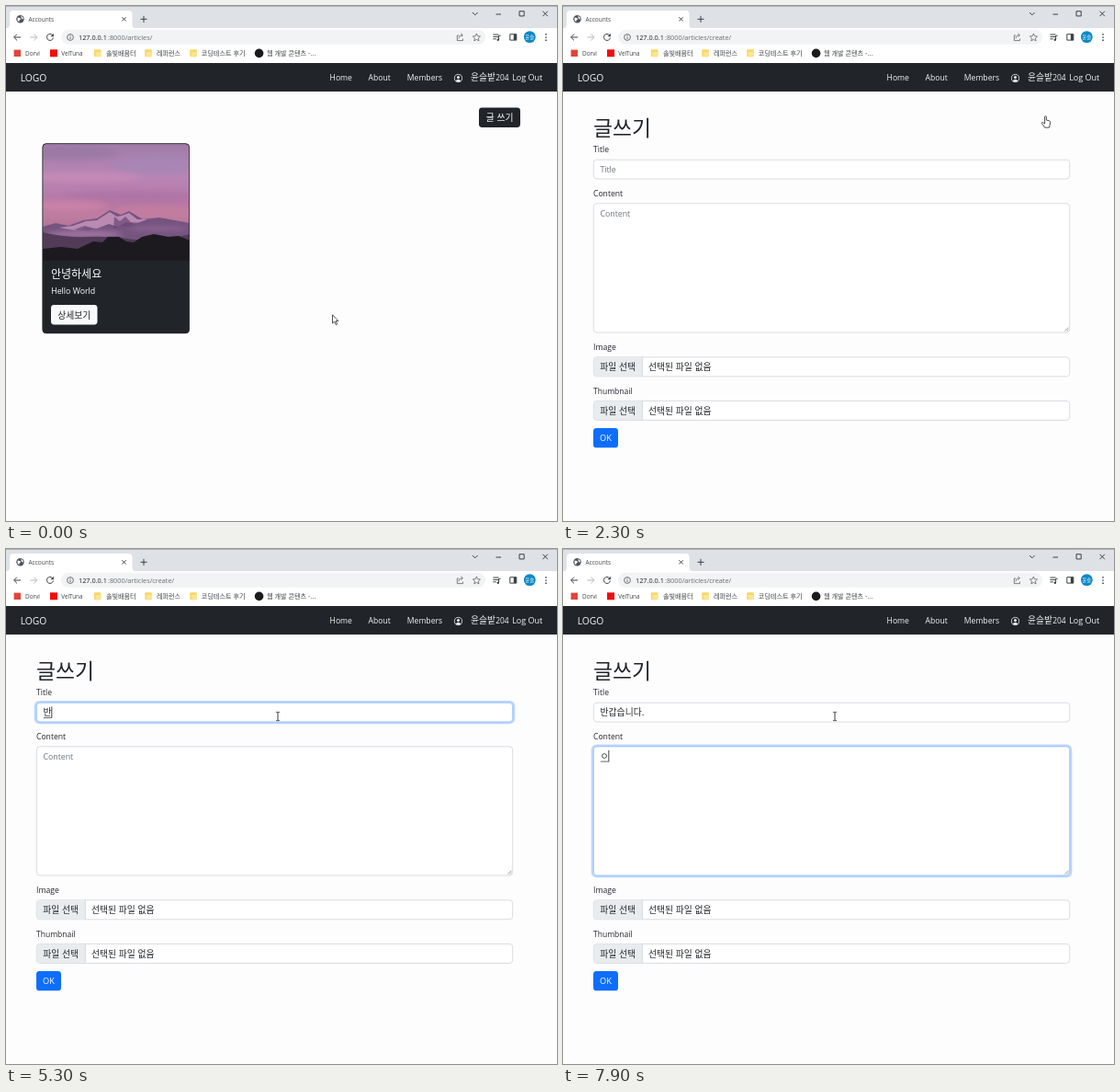
Recreate the animation shown at these times as an HTML page. Size 600 by 560 pixels, loop 8000 ms.

```html
<!DOCTYPE html>
<html lang="ko">
<head>
<meta charset="utf-8">
<title>Accounts</title>
<style>
  html, body { margin: 0; width: 100%; height: 100%; overflow: hidden; background: #fefdfe; }
  svg { display: block; width: 100%; height: 100%; }
  text { font-family: "Open Sans", "Noto Sans", sans-serif; font-size: 8.6px; fill: #212529; white-space: pre; }
  text.ko { font-family: "Noto Sans CJK KR", "Noto Sans CJK", "Noto Sans CJK JP", sans-serif; font-size: 9.8px; }
  .line { fill: none; stroke: #3c4043; stroke-width: 1; }
</style>
</head>
<body>
<svg id="stage" viewBox="0 0 600 560" xmlns="http://www.w3.org/2000/svg"></svg>
<script>
const LOOP = 8000, STEP = 100;
const HANGUL = /[\u3131-\u318e\uac00-\ud7a3]/;
const stage = document.getElementById('stage');

// Markup helpers
const text = (x, y, s, size, fill, extra = '') =>
  `<text class="${HANGUL.test(s) ? 'ko' : ''}" x="${x}" y="${y}" style="` +
  `${size ? `font-size:${size}px;` : ''}${fill ? `fill:${fill}` : ''}" ${extra}>${s}</text>`;
const rect = (x, y, w, h, r, fill, extra = '') =>
  `<rect x="${x}" y="${y}" width="${w}" height="${h}" rx="${r}" fill="${fill}" ${extra}/>`;
const circle = (x, y, r, fill, extra = '') =>
  `<circle cx="${x}" cy="${y}" r="${r}" fill="${fill}" ${extra}/>`;
const line = (d, extra = '') => `<path class="line" d="${d}" ${extra}/>`;
const shape = (d, fill, extra = '') => `<path d="${d}" fill="${fill}" ${extra}/>`;
const blob = (x, y, rx, ry, fill, o) =>
  `<ellipse cx="${x}" cy="${y}" rx="${rx}" ry="${ry}" fill="${fill}" opacity="${o}" filter="url(#soft)"/>`;
const folder = x =>
  rect(x - 3.8, 47.2, 7.6, 8, 1, '#f8d767') + rect(x - 2.2, 50, 6, 5.2, .8, '#fbe493');

function browser() {
  const tabStrip =
    rect(0, 0, 600, 24, 0, '#dee1e6') + rect(0, 0, 600, .7, 0, '#a4a6aa') +
    shape('M1 24Q4 24 4 20V9Q4 5 8 5H133.5Q137.5 5 137.5 9V20Q137.5 24 140.5 24Z', '#fff') +
    circle(15.5, 14.2, 4.2, '#50545a') +
    shape('M12.6 12.4l2.6 .5 1 1.4 -1.6 1 -.4 2 -1.6-1.6zM16 11l2.2 1 .6 2.4 -1.6-.4z', '#fff') +
    text(24.5, 16.7, 'Accounts', 6.5, '#45484c') +
    line('M126.4 12.2l4.2 4.2m0-4.2l-4.2 4.2') +
    line('M146.5 14.3h7m-3.5-3.5v7') +
    line('M508 7l2.8 2.8 2.8-2.8', 'stroke-width=".9"') +
    line('M533.5 9h5.5') +
    line('M559 5.7h5.2v5.2h-5.2z') +
    line('M584.5 5.7l5.4 5.4m0-5.4l-5.4 5.4');
  const tools =
    rect(0, 24, 600, 38, 0, '#fff') + rect(60, 25.8, 462, 16, 8, '#f1f3f4') +
    line('M16 34H8.7m3.3-3.4L8.6 34l3.4 3.4') +
    line('M26.4 34h7.3m-3.3-3.4l3.4 3.4-3.4 3.4', 'style="stroke:#b5b8bc"') +
    line('M50.6 31.6a3.5 3.5 0 1 0 .8 3') + shape('M51.9 29.8v3.4h-3.4z', '#3c4043') +
    circle(70, 34, 3.4, 'none', 'stroke="#5f6368" stroke-width=".9"') +
    line('M70 33.5v2.4M70 31.7v.9', 'style="stroke:#5f6368"') +
    text(79, 36.6, '127.0.0.1', 7.3, '#202124') +
    text(111, 36.6, '', 7.3, '#686c70', 'id="path"') +
    line('M493.3 32h-2v5.6h6.2v-2M493 35.4c.2-2.6 1.6-3.6 4-3.7m-1.6-1.8l2 1.8-2 1.9', 'style="stroke:#5f6368;stroke-width:.8"') +
    line('M512.4 30l1.2 2.7 2.9.3-2.2 2 .7 2.9-2.6-1.5-2.6 1.5.7-2.9-2.2-2 2.9-.3z', 'style="stroke:#5f6368;stroke-width:.8"') +
    line('M530.4 31h6m-6 2.4h6m-6 2.4h3.4m2.8 1v-4.6h2') + circle(535.8, 36.8, 1.2, '#3c4043') +
    line('M548.8 30.7h7v6.4h-7z') + rect(552.8, 30.7, 3, 6.4, 0, '#3c4043') +
    circle(570.3, 33.6, 6.4, '#0b88c6') +
    text(570.3, 35.7, '윤슬', 5.4, '#fff', 'text-anchor="middle"') +
    [30.8, 34, 37.2].map(y => circle(588, y, .85, '#3c4043')).join('');
  const marks =
    rect(8.6, 47.6, 7.4, 7.4, 0, '#e0453a') + text(21, 53.6, 'Dorvi', 6.4, '#3c4043') +
    rect(48, 47.3, 8, 8, 0, '#f00d0d') + text(60.3, 53.6, 'VelTuna', 6.3, '#3c4043') +
    folder(99.6) + text(109, 53.8, '솔빛배움터', 7.1, '#3c4043') +
    folder(155) + text(164, 53.8, '레퍼런스', 7.1, '#3c4043') +
    folder(204) + text(212.8, 53.8, '코딩테스트 후기', 7.1, '#3c4043') +
    circle(275.6, 51.4, 4.8, '#1b1b1d') + text(284, 53.8, '웹 개발 콘텐츠 -...', 7.1, '#3c4043');
  return tabStrip + tools + marks;
}

function navbar() {
  const white = '#f4f4f5';
  return rect(0, 62, 600, 31, 0, '#212529') +
    text(15.7, 81.8, 'LOGO', 10.3, white) +
    text(352.6, 80.9, 'Home', 8.6, white) +
    text(394.6, 80.9, 'About', 8.6, white) +
    text(436.8, 80.9, 'Members', 8.6, white) +
    circle(492.5, 78.5, 4.1, 'none', `stroke="${white}" stroke-width=".8"`) +
    circle(492.5, 77.4, 1.5, white) + shape('M489.6 81.2q2.9-3 5.8 0q-2.9 2.4-5.8 0z', white) +
    text(506, 81.4, '윤슬밭', 9.8, white) + text(533.2, 80.9, '204', 8.4, white) +
    text(551.2, 80.9, 'Log Out', 9, white);
}

function photo() {
  return `<g clip-path="url(#frame)">` + rect(40, 150, 160, 127, 0, 'url(#sky)') +
    blob(70, 160, 50, 7, '#9077a0', .55) + blob(165, 172, 48, 11, '#a387b6', .6) +
    blob(85, 186, 60, 6, '#cd8db8', .55) + blob(135, 206, 70, 5, '#a56fa3', .5) +
    blob(65, 217, 45, 6, '#d488a9', .6) + blob(160, 222, 45, 6, '#c87fa0', .55) +
    shape('M40 240l14-4 14 3 16-6 15-2 14-9 12 5 9-4 15 9 18-2 33 6v45H40z', '#75547f') +
    shape('M58 241l15-2 14-5 12-1 14-9 8 5 5-1 8-3 9 7 11 0-14 5-9-2-9 5-10-3-13 5-12-1-12 3z', '#c794bd', 'opacity=".85"') +
    shape('M118 229l6 5 6-5 6 6 8 1-8 5-10-2-9 3zM74 243l12-4 10 3-8 3z', '#694873', 'opacity=".7"') +
    blob(85, 248, 42, 4, '#a77aa5', .8) + blob(165, 242, 34, 3.5, '#8d6593', .75) +
    shape('M40 246q22 6 48 5t52 3 60-6v30H40z', '#513b57') +
    shape('M40 264l20-2 18 2 17-8 10 1 6-6 12 0 8 5 8 1 9-6 13-3 16 3 11-1 12 5v22H40z', '#1d1a1f') +
    `</g>`;
}

function listPage() {
  return rect(515, 110.5, 45, 21.5, 3.4, '#212529', 'id="write"') +
    text(522.7, 124.9, '글 쓰기', 9.8, '#fff') +
    rect(39.7, 149.5, 160, 206.5, 4, '#212529') + photo() +
    rect(39.9, 149.7, 159.6, 206.1, 4, 'none', 'stroke="#25242b" stroke-width=".7"') +
    text(49, 296.4, '안녕하세요', 12, '#fff') +
    text(49.2, 313, 'Hello World', 8.8, '#fff') +
    rect(49, 325, 50.5, 21.5, 3.4, '#f8f9fa') + text(56.3, 339.5, '상세보기', 9.8);
}

const field = (id, y, h, hint) =>
  rect(31.9, y - 1.1, 521.2, h + 2.2, 4.6, 'none', `id="${id}Glow" stroke="#0d6efd" stroke-width="2.4" stroke-opacity="0"`) +
  rect(33.3, y, 518.4, h, 3.5, '#fff', `id="${id}Box" stroke="#ced4da" stroke-width=".8"`) +
  text(40.4, y + 14, hint, 8.8, '#6c757d', `id="${id}Hint"`) +
  text(40.6, y + 14.2, '', 0, '', `id="${id}Text"`);

const fileField = y =>
  rect(33.3, y, 518.4, 21, 3.5, '#fff', 'stroke="#ced4da" stroke-width=".8"') +
  shape(`M86.2 ${y + .4}H37q-3.3 0-3.3 3.3v13.6q0 3.3 3.3 3.3H86.2z`, '#e9ecef') +
  line(`M86.4 ${y}v21`, 'style="stroke:#ced4da;stroke-width:.8"') +
  text(40.3, y + 14.3, '파일 선택') + text(93, y + 14.3, '선택된 파일 없음');

function formPage() {
  return text(33, 141, '글쓰기', 22.8) +
    text(33, 159.2, 'Title') + field('title', 167.2, 20.8, 'Title') +
    text(33, 206.8, 'Content') + field('content', 214.8, 140.2, 'Content') +
    line('M546.5 353.6l4-4m-1.8 4l1.8-1.8', 'style="stroke:#777;stroke-width:.7"') +
    text(33, 374, 'Image', 8.7) + fileField(381.8) +
    text(33, 421.6, 'Thumbnail', 8.5) + fileField(429.4) +
    rect(33, 459, 27, 21.3, 3.4, '#0d6efd') + text(40, 473, 'OK', 9.2, '#fff') +
    line('', 'id="under" style="stroke:#212529;stroke-width:.7"') +
    line('', 'id="caret" style="stroke:#111;stroke-width:.8"');
}

const pointers =
  shape('M0 0V9.2l2.2-2 1.5 3.5 1.5-.7-1.5-3.3H6.4z', '#fff', 'id="arrow" stroke="#222" stroke-width=".8"') +
  shape('M-.9 .7q.9-1 1.8 0V4.6l3 .7q1.3.4 1.2 1.8l-.5 3-.8 2.6H-.9l-3.2-4.6q-.2-1.3 1.2-1l2 1.5z',
    '#fff', 'id="hand" stroke="#222" stroke-width=".8" stroke-linejoin="round"') +
  line('M-1.8-4.6H-.5L0-4.2.5-4.6H1.8M0-4.2V4.2M-1.8 4.6H-.5L0 4.2.5 4.6H1.8',
    'id="beam" style="stroke:#222;stroke-width:.9"');

stage.innerHTML = `<defs>
  <linearGradient id="sky" x1="0" y1="0" x2="0" y2="1">
    <stop offset="0" stop-color="#a17ca9"/><stop offset=".28" stop-color="#b986b5"/>
    <stop offset=".5" stop-color="#b677a5"/><stop offset=".62" stop-color="#bf7da0"/>
    <stop offset="1" stop-color="#80577f"/></linearGradient>
  <filter id="soft" x="-50%" y="-150%" width="200%" height="400%"><feGaussianBlur stdDeviation="5 2.5"/></filter>
  <clipPath id="frame"><path d="M40 277V154q0-4 4-4H195.5q4 0 4 4V277z"/></clipPath></defs>` +
  rect(0, 0, 600, 560, 0, '#fefdfe') + browser() + navbar() +
  `<g id="list">${listPage()}</g><g id="form">${formPage()}</g><g id="pointer">${pointers}</g>`;

const el = {};
stage.querySelectorAll('[id]').forEach(n => el[n.id] = n);
const show = (node, on) => node.setAttribute('display', on ? 'inline' : 'none');
const clamp = v => Math.max(0, Math.min(1, v));
const smooth = p => p * p * (3 - 2 * p);
const mix = (a, b, p) => `rgb(${a.map((v, i) => Math.round(v + (b[i] - v) * p))})`;

const OPEN = 2300;
// Pointer moves: start, end, then the point reached
const HOME = [355.5, 335.8];
const MOVES = [
  [900, 1600, 525, 117.5],
  [1900, 2100, 525.5, 119.5],
  [2300, 3000, 260.5, 178.3],
  [3300, 3600, 296, 182]
];
// Key strokes: time, field, its whole text
const KEYS = [[3100, 'title', '']].concat(
  [[4500, 'q'], [4700, 'qksr'], [4900, 'qk'], [5000, ''], [5100, 'ㅂ'], [5200, '바'], [5300, '반'],
   [5400, '반가'], [5500, '반갑'], [5700, '반갑ㅅ'], [5900, '반갑스'], [6000, '반갑습'], [6200, '반갑습ㄴ'],
   [6300, '반갑습니'], [6400, '반갑습닏'], [6500, '반갑습니다'], [6600, '반갑습니다.']]
    .map(([t, s]) => [t, 'title', s]),
  [[7200, 'content', ''], [7900, 'content', 'ㅇ']]);

function drawPointer(t) {
  let [x, y] = HOME;
  for (const [from, to, tx, ty] of MOVES) {
    const p = smooth(clamp((t - from) / (to - from)));
    x += (tx - x) * p;
    y += (ty - y) * p;
  }
  const onButton = t < OPEN && x > 515 && x < 560 && y > 110 && y < 132;
  const onField = t > OPEN && y > 167 && y < 188;
  const kind = onButton || t === OPEN ? 'hand' : onField ? 'beam' : 'arrow';
  ['arrow', 'hand', 'beam'].forEach(k => show(el[k], k === kind));
  el.pointer.setAttribute('transform', `translate(${x.toFixed(2)} ${y.toFixed(2)})`);
  el.write.setAttribute('fill', onButton ? '#424649' : '#212529');
}

function drawFocus(id, p) {
  el[id + 'Glow'].setAttribute('stroke-opacity', .27 * p);
  el[id + 'Box'].setAttribute('stroke', mix([206, 212, 218], [134, 183, 254], p));
}

function drawField(id, t) {
  const last = KEYS.filter(k => k[0] <= t && k[1] === id).pop();
  const value = last ? last[2] : '';
  const node = el[id + 'Text'];
  node.textContent = value;
  node.setAttribute('class', HANGUL.test(value) ? 'ko' : '');
  show(el[id + 'Hint'], !value);
}

function drawCaret(t) {
  const key = KEYS.filter(k => k[0] <= t).pop();
  const on = key && Math.floor((t - key[0]) / 500) % 2 === 0;
  show(el.caret, on);
  show(el.under, false);
  if (!key) return;
  const [, id, value] = key;
  const node = el[id + 'Text'];
  const top = id === 'title' ? 171.3 : 218.9;
  const end = 40.6 + (value ? node.getComputedTextLength() : 0);
  el.caret.setAttribute('d', `M${end + .2} ${top}v12.4`);
  if (HANGUL.test(value.slice(-1))) {
    const w = node.getSubStringLength(value.length - 1, 1);
    el.under.setAttribute('d', `M${end - w + .3} ${top + 12.2}H${end}`);
    show(el.under, true);
  }
}

function draw(t) {
  const writing = t >= OPEN;
  show(el.list, !writing);
  show(el.form, writing);
  el.path.textContent = ':8000/articles/' + (writing ? 'create/' : '');
  drawPointer(t);
  const swap = smooth(clamp((t - 7160) / 180));
  drawFocus('title', smooth(clamp((t - 3030) / 150)) * (1 - swap));
  drawFocus('content', swap);
  drawField('title', t);
  drawField('content', t);
  drawCaret(t);
}

const start = performance.now();
function tick() {
  const t = (performance.now() - start) % LOOP;
  draw(Math.floor(t / STEP) * STEP);
  requestAnimationFrame(tick);
}
tick();
</script>
</body>
</html>
```
